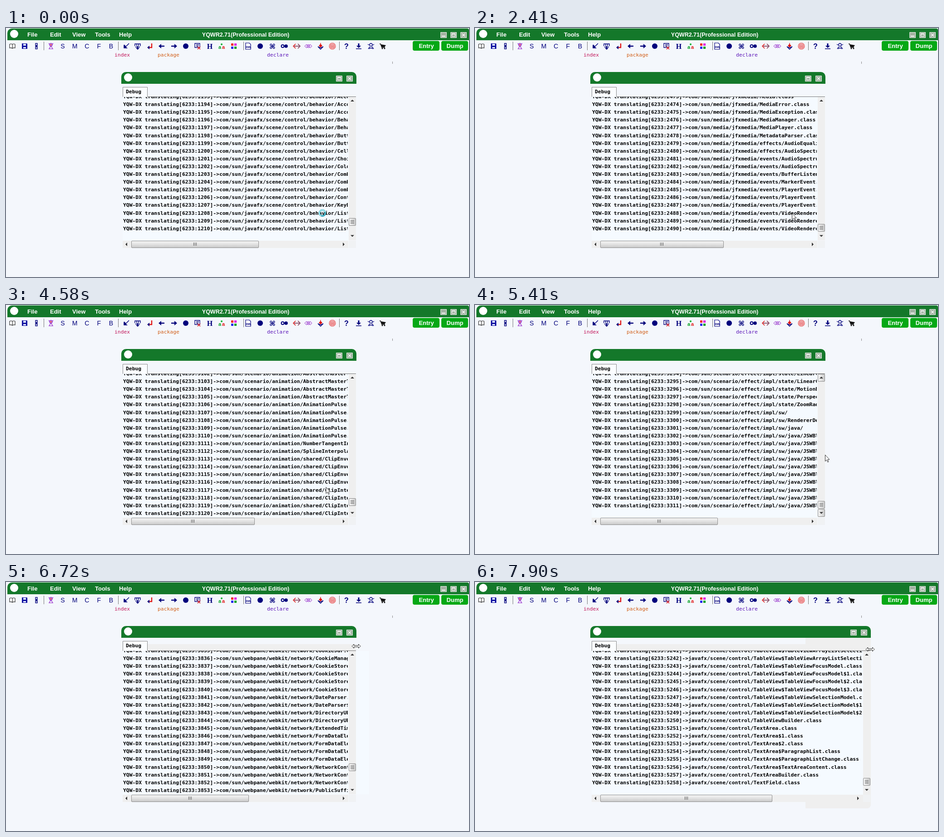
Recreate the animation shown at these times as an HTML page with a canvas. Size 1020x549 px, loop 8000 ms.

```html
<!DOCTYPE html>
<html lang="en">
<head>
<meta charset="utf-8">
<title>Debug log</title>
<style>
html, body { margin: 0; width: 100%; height: 100%; overflow: hidden; background: #f4f7fc; }
canvas { display: block; }
</style>
</head>
<body>
<canvas id="stage" width="1020" height="549"></canvas>
<script>
const ctx = document.getElementById('stage').getContext('2d');
const LOOP = 8000;
const BG = '#f4f7fc', LIST = '#f5faff', PANE = '#efefef', GREEN = '#14782a';
const NAVY = '#00007c', RED = '#e01818', PURPLE = '#9022c8';
const SANS = '"Liberation Sans", Arial, sans-serif';
const MONO = '"DejaVu Sans Mono", monospace';

// Log pages: start, last number, folder, classes, thumb y while unsettled, settle time.
// "Name*n" repeats a class, "#" counts the repeats.
const PAGES = [
  [0, 1210, 'com/sun/javafx/scene/control/behavior/', 'AccordionBehavior*3 Behavior*2 ButtonBehavior*2 CellBehavior ChoiceBox ColorPicker ComboBox*3 ContextMenu KeyBinding ListView*3', 427, 50],
  [50, 1531, 'com/sun/javafx/scene/control/skin/', 'ListViewSkin$#*7 MenuBarSkin MenuBarSkin$#*7 MenuButtonSkin*3', 427, 120],
  [640, 1846, 'com/sun/javafx/scene/layout/region/', 'BackgroundFill*3 BackgroundImage*5 BorderImage*4 Margins*3 Repeat*4', 430, 690],
  [1190, 2104, 'com/sun/javafx/sg/', 'PGArc PGCanvas PGCircle PGCubicCurve PGEllipse PGGroup PGImageView PGLine PGMediaView PGNode PGNode$#*3 PGPath PGPolygon PGRectangle PGRegion PGShape PGText', 432, 1250],
  [1300, 2157, 'com/sun/javafx/sg/prism/', 'EffectUtil NGArc NGCanvas NGCanvas$1 NGCanvas$EffectInput NGCanvas$InitType NGCanvas$MyBlend NGCanvas$PixelData NGCanvas$RenderBuf NGCanvas$RenderInput NGCircle NGCubicCurve NGEllipse NGGroup NGImageView NGLine NGMediaView NGNode'],
  [1800, 2324, 'com/sun/javafx/tk/quantum/', 'GlassScene GlassScene$#*5 GlassStage GlassStage$#*3 GlassViewEventHandler*5 MasterTimer OverlayWarning*3', 434, 1860],
  [2410, 2490, 'com/sun/media/jfxmedia/', 'Media MediaError MediaException MediaManager MediaPlayer MetadataParser effects/AudioEqualizer effects/AudioSpectrum events/AudioSpectrum*2 events/BufferListener events/MarkerEvent events/PlayerEvent*3 events/VideoRenderer*3'],
  [2910, 2655, 'com/sun/prism/', 'BasicStroke CompositeMode Graphics GraphicsPipeline GraphicsPipeline$#*3 GraphicsResource Image Image$#*2 MediaFrame MeshView MultiTexture PhongMaterial PixelFormat PixelSource Presentable', 436, 2960],
  [3470, 2821, 'com/sun/prism/impl/ps/', 'AATessCallbacks AATessEllipseRep AATessRoundRectRep AATessShapeRep AATessShapeRepState AATessShapeRepState$#*5 AATesselatorImpl AATesselatorImpl$Close AATesselatorImpl$Cubic AATesselatorImpl$Line AATesselatorImpl$Move AATesselatorImpl$Seg*2 BaseShaderContext BaseShaderContext$1', 436, 3520],
  [4020, 2987, 'com/sun/prism/shader/', 'DrawCircle_Color_Loader*3 DrawEllipse_Color_Loader*4 DrawPgram_Color_Loader*4 FillCircle_Color_Loader*4 FillEllipse_Color_Loader*4', 436, 4070],
  [4580, 3120, 'com/sun/scenario/animation/', 'AbstractMasterTimer*4 AnimationPulse*5 NumberTangentInterpolator SplineInterpolator shared/ClipEnvelope*4 shared/ClipInterpolator*4', 434, 4650],
  [5010, 3226, 'com/sun/scenario/effect/', 'Blend$Mode*3 BoxBlur BoxShadow Brightpass Color4f ColorAdjust Crop DisplacementMap DropShadow Effect$#*4 Filterable Flood GaussianBlur'],
  [5290, 3311, 'com/sun/scenario/effect/impl/', 'state/LinearConvolve*2 state/MotionBlur state/Perspective state/ZoomRadial sw/ sw/RendererDelegate sw/java/ sw/java/JSWBlend*10'],
  [5590, 3424, 'com/sun/scenario/effect/impl/sw/sse/', 'SSEBlend_ADD*5 SSEBoxBlur*3 SSEBoxShadow*3 SSEBrightpass*3 SSEColorAdjust*4'],
  [5950, 3561, 'com/sun/webpane/perf/', 'Logger*3 WCFontPerfLogger*5 WCGraphicsPerfLogger*6 WCPageLogger*4', 436, 6010],
  [6300, 3702, 'com/sun/webpane/platform/', 'BackForwardList*4 ConfigManager CursorManager DisposerRecord*3 InputMethodClient Invoker LoadListenerClient*3 Pasteboard PolicyClient ThemeClient*2'],
  [6720, 3853, 'com/sun/webpane/webkit/network/', 'CookieJar CookieManager CookieStore*4 DateParser DateParser$1 DirectoryURL*2 ExtendedTime FormDataElement*4 NetworkContext*3 PublicSuffixes', 408, 6780],
  [7150, 4126, 'javafx/animation/', 'Animation Animation$#*6 AnimationBuilder AnimationTimer FadeTransition FadeTransition$#*3 FillTransition KeyFrame KeyValue ParallelTransition PathTransition PauseTransition', 430, 7220],
  [7500, 4510, 'javafx/embed/swing/', 'InputMethodSupport*2 JFXPanel JFXPanel$#*9 SwingCursors SwingDnD SwingDnD$#*3 SwingEvents'],
  [7780, 4824, 'javafx/scene/chart/', 'StackedBarChart$3 StackedBarChart$4 StackedBarChart$5 StackedBarChart$6 StackedBarChart$StyleableProperties*2 StackedBarChartBuilder ValueAxis ValueAxis$#*6 ValueAxis$StyleableProperties*4'],
  [7840, 5258, 'javafx/scene/control/', 'TableView$TableViewArrayListSelectionModel*2 TableView$TableViewFocusModel TableView$TableViewFocusModel$#*3 TableView$TableViewSelectionModel TableView$TableViewSelectionModel$#*2 TableViewBuilder TextArea TextArea$#*2 TextArea$ParagraphList TextArea$ParagraphListChange TextArea$TextAreaContent TextAreaBuilder TextField', 432, 7900]
].map(([start, last, folder, spec, thumb = 440, settle = start]) =>
  ({ start, last, folder, names: expand(spec), thumb, settle }));

function expand(spec) {
  return spec.split(' ').flatMap(item => {
    const [name, count = 1] = item.split('*');
    return Array.from({ length: +count }, (_, i) =>
      name.replace('#', i + 1) + (name.endsWith('/') ? '' : '.class'));
  });
}

function rect(x, y, w, h, color) {
  ctx.fillStyle = color;
  ctx.fillRect(x, y, w, h);
}

function box(x, y, w, h, fill, border, radius = 0) {
  ctx.beginPath();
  ctx.roundRect(x, y, w, h, radius);
  if (fill) { ctx.fillStyle = fill; ctx.fill(); }
  if (border) { ctx.strokeStyle = border; ctx.lineWidth = 1; ctx.stroke(); }
}

function disc(x, y, r, color) {
  ctx.fillStyle = color;
  ctx.beginPath();
  ctx.arc(x, y, r, 0, 7);
  ctx.fill();
}

function ring(x, y, r, color, width, from = 0, to = 7) {
  ctx.strokeStyle = color;
  ctx.lineWidth = width;
  ctx.beginPath();
  ctx.arc(x, y, r, from, to);
  ctx.stroke();
}

function text(s, x, y, font, color, align = 'left') {
  ctx.font = font;
  ctx.fillStyle = color;
  ctx.textAlign = align;
  ctx.fillText(s, x, y);
}

// Monospaced text laid out on an 8 px grid and shown at 0.855 scale.
function mono(s, x, y, color = '#000', weight = 'bold') {
  ctx.save();
  ctx.translate(x, y);
  ctx.scale(.855, .855);
  text(s, 0, 0, `${weight} 13.29px ${MONO}`, color);
  ctx.restore();
}

function shape(x, y, d, stroke, fill, width = 1.5) {
  const p = new Path2D(d);
  ctx.save();
  ctx.translate(x, y);
  if (fill) { ctx.fillStyle = fill; ctx.fill(p); }
  if (stroke) { ctx.strokeStyle = stroke; ctx.lineWidth = width; ctx.stroke(p); }
  ctx.restore();
}

const icon = (x, d, stroke, fill, width) => shape(x, 40, d, stroke, fill, width);

function frameButton(x, y, kind) {
  box(x + .5, y + .5, 13, 12, '#a3b3a3', '#e4eee4');
  if (kind === 'min') rect(x + 3, y + 8, 8, 2, '#fff');
  if (kind === 'max') { box(x + 3.5, y + 3.5, 7, 6, null, '#fff'); rect(x + 3, y + 3, 8, 2, '#fff'); }
  if (kind === 'close') shape(x + 7, y + 6.5, 'M-3 -3L3 3M3 -3L-3 3', '#fff');
}

function toolbar() {
  for (const x of [83, 247, 523, 734]) rect(x, 30, 1, 19, '#777');
  icon(14, 'M0 -4Q-3 -6 -6 -4V4Q-3 3 0 5Q3 3 6 4V-4Q3 -6 0 -4V5', '#333', '#fff', 1.2);
  icon(41, 'M-6 -6H5L6 -5V6H-6Z', null, '#1010a0');
  rect(38, 35, 6, 4, '#dfe6ff'); rect(38, 42, 6, 3, '#dfe6ff');
  icon(67, 'M-2 -6H2V-1H-2ZM-2 1H2V6H-2ZM0 -3V3', NAVY, null, 1.3);
  ring(99, 37, 3, PURPLE, 1.3);
  disc(99, 37, 1.5, RED);
  icon(99, 'M-5 -6L-3 -4M5 -6L3 -4M-4 6L-1 1H1L4 6M-5 6H5', PURPLE, null, 1.2);
  [...'SMCFB'].forEach((c, i) => text(c, 125 + i * 26.6, 45, `14px ${SANS}`, NAVY, 'center'));
  icon(265, 'M6 -6L-1 1M-5 -1V4H1ZM-5 -3L-1 1', NAVY, NAVY);
  icon(290, 'M-6 0V-5H6V0M-2 -5V0M2 -5V0M-5 2H5', NAVY, null, 1.4);
  icon(290, 'M-1 0H1V4H4L0 8L-4 4H-1Z', null, NAVY);
  icon(317, 'M4 -6V3H-2', RED, null, 2.4);
  icon(317, 'M-6 3L-1 -1V7Z', null, NAVY);
  for (const [x, s] of [[343, 1], [370, -1]])
    icon(x, `M${-7 * s} 0L${-1 * s} -5V-1.2H${6 * s}V1.2H${-1 * s}V5Z`, null, NAVY);
  disc(396, 40, 6, NAVY);
  icon(422, 'M-6 -6H5V3H-6ZM-3 -3H3M-3 0H2', NAVY, '#fff', 1.3);
  icon(425, 'M-3 1L3 7M3 1L-3 7', RED);
  text('H', 449, 46, 'bold 16px "Liberation Serif", serif', NAVY, 'center');
  text('a', 471, 46, `bold 11px ${SANS}`, '#00a020', 'center');
  text('a', 479, 46, `bold 11px ${SANS}`, RED, 'center');
  disc(475, 36, 2, '#00b030');
  rect(496, 34, 5, 5, '#f01818'); rect(503, 34, 5, 5, '#e000e0');
  rect(496, 41, 5, 5, '#2020f0'); rect(503, 41, 5, 5, '#00a020');
  icon(533, 'M-5 -7H3L6 -4V7H-5Z', NAVY, '#fff', 1.2);
  text('XML', 534, 44, `bold 6px ${SANS}`, NAVY, 'center');
  disc(560, 40, 6, NAVY);
  text('⌘', 587, 46, `bold 15px "DejaVu Sans", sans-serif`, NAVY, 'center');
  ring(609.5, 40, 3, NAVY, 2);
  icon(610, 'M3 0H6', NAVY, null, 2);
  disc(617, 40, 3.8, NAVY);
  icon(640, 'M-2 -5L-7 0L-2 5', RED, null, 1.6);
  icon(640, 'M3 -5L8 0L3 5M-5 0H6', '#702040', null, 1.4);
  for (const dx of [-4, 0, 4]) icon(666 + dx, 'M-4 0L0 -4L4 0L0 4Z', PURPLE, null, 1);
  icon(693, 'M-6 1L0 7L6 1M-6 1L0 4L6 1', NAVY, null, 1.4);
  icon(693, 'M0 -7V-2M0 -4L3 -1L0 2L-3 -1Z', RED, RED, 1.4);
  for (const r of [1, 3, 5, 7]) ring(719, 40, r, '#e84848', 1.1);
  text('?', 750, 46, `bold 16px ${SANS}`, NAVY, 'center');
  icon(777, 'M-1.5 -6H1.5V-1H5L0 4L-5 -1H-1.5ZM-6 5H6V6.5H-6Z', null, NAVY);
  icon(804, 'M-3 -3A3 3 0 1 0 3 -3A3 3 0 1 0 -3 -3M-6 6L-2 1M6 6L2 1M-7 -4L-3 -2M7 -4L3 -2M-4 6Q0 2 4 6', NAVY, null, 1.3);
  icon(830, 'M-7 -5H-5L-2 3H5', '#111', null, 1.4);
  icon(830, 'M-4 -4L7 -2L4 2H-2Z', null, '#111');
  disc(829, 45, 1.5, '#111'); disc(834, 45, 1.5, '#111');
  for (const [x, label] of [[896, 'Entry'], [959, 'Dump']]) {
    box(x, 28.5, 59, 21.5, '#06a815', null, 4);
    text(label, x + 30, 44, `bold 13px ${SANS}`, '#fff', 'center');
  }
}

function mainWindow() {
  rect(0, 0, 1020, 549, BG);
  box(3, 1, 1017, 26, GREEN, null, [10, 4, 0, 0]);
  disc(18, 13, 9, '#fff');
  [['File', 47], ['Edit', 97], ['View', 146], ['Tools', 196], ['Help', 249]]
    .forEach(([s, x]) => text(s, x, 19, `bold 13px ${SANS}`, '#fff'));
  text('YQWR2.71(Professional Edition)', 528, 19, `bold 12.5px ${SANS}`, '#fff', 'center');
  frameButton(957, 9, 'min');
  frameButton(979, 9, 'max');
  frameButton(1001, 9, 'close');
  toolbar();
  mono('index', 239, 63, '#c2185b', 'normal');
  mono('package', 334, 63, '#d2601a', 'normal');
  mono('declare', 575, 63, '#5b16b8', 'normal');
  rect(851, 74, 1, 5, '#888');
}

function log(page, t, shift) {
  const rows = t < page.settle ? page.names : page.names.slice(-18);
  ctx.save();
  ctx.beginPath();
  ctx.rect(257, 152, 496 + shift, 316);
  ctx.clip();
  rows.forEach((name, i) => {
    const number = page.last - rows.length + 1 + i;
    mono(`YQW-DX translating[6233:${number}]->${page.folder}${name}`, 258, 155 + i * 17.1);
  });
  ctx.restore();
}

function thumb(x, y, w, h, vertical) {
  const shade = ctx.createLinearGradient(x, y, vertical ? x + w : x, vertical ? y : y + h);
  shade.addColorStop(0, '#f6f6f6');
  shade.addColorStop(.5, '#e2e2e2');
  shade.addColorStop(1, '#c6c6c6');
  box(x + .5, y + .5, w - 1, h - 1, shade, '#8e8e8e', 1.5);
}

function scrollbars(t, page, shift) {
  const right = 755 + shift;
  rect(right, 152, 16, 316, '#efefef');
  rect(257, 469, 497 + shift, 16, '#efefef');
  rect(right, 469, 16, 16, '#f0f2f4');
  if (t >= 5290 && t < 5950) {
    thumb(right, 152, 16, 17, true);
    thumb(right, 450, 16, 17, true);
  }
  shape(right + 8, 160, 'M-4 2L0 -2L4 2Z', null, '#333');
  shape(right + 8, 458, 'M-4 -1.5L0 2.5L4 -1.5Z', null, '#333');
  shape(265, 477, 'M2 -4L-2 0L2 4Z', null, '#333');
  shape(744 + shift, 477, 'M-2 -4L2 0L-2 4Z', null, '#333');

  const y = t < page.settle ? page.thumb : 440;
  thumb(right, y - 8, 16, 17, true);
  for (const dy of [-3, 0, 3]) rect(right + 4, y + dy, 8, 1, '#555');

  const end = t < 120 ? 557 : t < 4930 ? 548 : t < 7900 ? 535 : 655;
  thumb(276, 469, end - 276, 16, false);
  const mid = Math.round((276 + end) / 2);
  for (const dx of [-4, -1, 2]) rect(mid + dx, 473, 1, 7, '#555');
}

function debugWindow(t) {
  const grow = t >= 7720 ? 100 : 0;
  const shift = t >= 7840 ? 100 : 0;
  const page = PAGES.findLast(p => p.start <= t);
  if (grow) box(728, 123, 144, 376, PANE, null, [0, 0, 8, 0]);
  else if (t >= 5770) rect(771, 152, 29, 316, LIST);
  if (t >= 6600) rect(312, 137, 459, 14, PANE);

  box(254, 97, 518 + grow, 26, GREEN, null, [10, 10, 0, 0]);
  disc(269, 109, 9, '#fff');
  frameButton(727 + grow, 105, 'max');
  frameButton(750 + grow, 105, 'close');

  rect(257, 151, 498 + shift, 318, LIST);
  log(page, t, shift);
  scrollbars(t, page, shift);
  rect(312, 151, 459 + shift, 1, '#777');
  box(257.5, 130.5, 54, 21, '#fbfdff', '#888');
  rect(258, 151, 53, 1, LIST);
  mono('Debug', 264, 144);
}

// Fraction of a move that advances in equal jumps.
function jumps(t, from, to, count) {
  const step = (to - from) / (count - 1);
  return Math.max(0, Math.min(1, (Math.floor((t - from) / step) + 1) / count));
}

function arrow(x, y) {
  shape(x, y, 'M.5 .5V14.5L3.7 11.5L6 16.5L8 15.6L5.8 10.8H10Z', '#333', '#fff', 1);
}

function cursor(t) {
  if (t < 50) {
    ring(697, 408, 6.5, '#3aa9bd', 3.5);
    ring(697, 408, 6.5, '#b4f0f5', 1.8, 2, 6);
  } else if (t < 870) {
    return;
  } else if (t < 1800) {
    shape(699, 409, 'M-3 -6.5H3M0 -6.5V7.5M-3 7.5H3', '#222', null, 1);
  } else if (t < 5410) {
    const k = jumps(t, 4580, 5290, 11);
    arrow(698 + 71 * k, 408 - 76 * k);
  } else if (t < 6600) {
    const k = jumps(t, 5770, 6540, 14), j = 1 - k;
    arrow(771 * j * j + 1612 * j * k + 772 * k * k, 330 * j * j + 460 * j * k + 139 * k * k);
  } else {
    const k = jumps(t, 7150, 7720, 10);
    shape(771.5 + 99 * k, 141.5 + 7 * k,
      'M-9.5 0L-5 -4.5V-1.5H5V-4.5L9.5 0L5 4.5V1.5H-5V4.5Z', '#222', '#fff', 1);
  }
}

let origin;
function draw(now) {
  origin ??= now;
  const t = (now - origin) % LOOP;
  mainWindow();
  debugWindow(t);
  cursor(t);
  requestAnimationFrame(draw);
}
requestAnimationFrame(draw);
</script>
</body>
</html>
```
